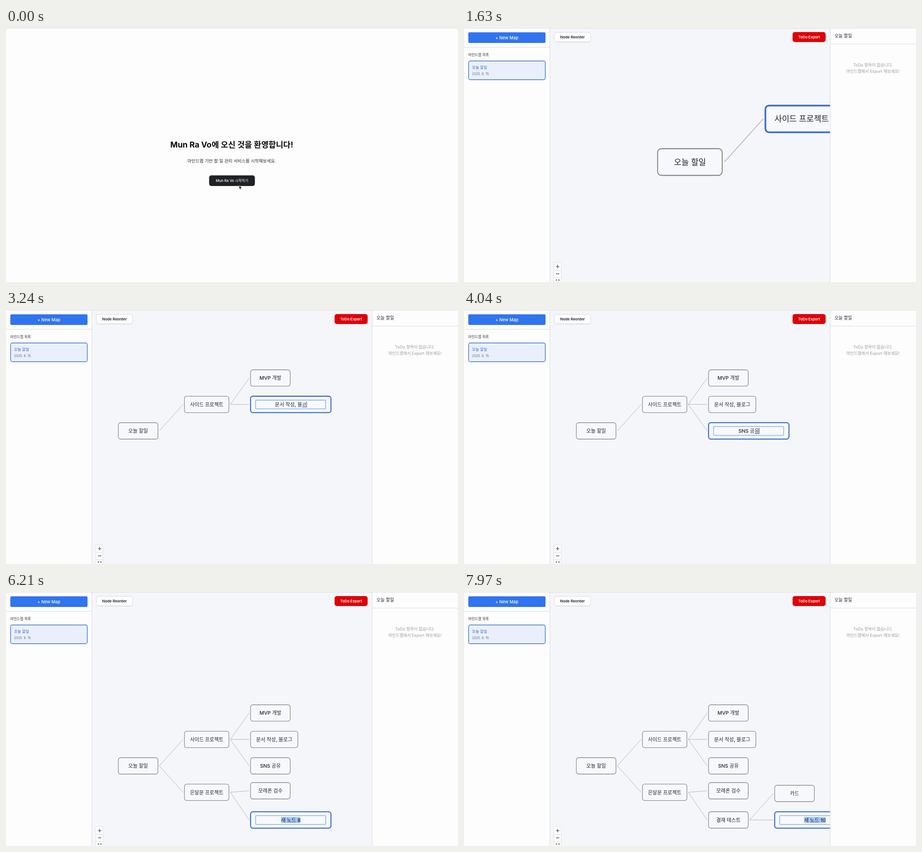
An HTML page for the animation above (8000 ms loop, 998 px wide and 561 px high).

```html
<!DOCTYPE html>
<html lang="ko">
<head>
<meta charset="utf-8">
<title>Mind map</title>
<style>
  html, body { margin: 0; width: 100%; height: 100%; overflow: hidden; background: #fdfdfd; }
  svg { display: block; width: 100%; height: 100%; }
  text { font-family: Inter, "Noto Sans CJK KR", "Noto Sans CJK", sans-serif; font-weight: 500; fill: #1f2533; white-space: pre; }
  .mid { text-anchor: middle; }
  .line { stroke: #d9dae3; }
  .icon { stroke: #333; stroke-width: 1.2; fill: none; }
  .node { font-size: 11px; }
</style>
</head>
<body>
<svg viewBox="0 0 998 561" preserveAspectRatio="none">
  <g id="app">
    <rect x="190" width="618" height="561" fill="#f5f6f9"/>
    <g id="map"></g>

    <rect x="200" y="10" width="80" height="22" rx="5" fill="#000" opacity=".07"/>
    <rect x="199.5" y="9.5" width="80" height="21" rx="5" fill="#fdfdfd" stroke="#d8d9df"/>
    <text class="mid" x="239.5" y="23" font-size="8.2" style="font-weight:600">Node Reorder</text>
    <rect x="725.5" y="9" width="73" height="22" rx="5" fill="#de0209"/>
    <text class="mid" x="762" y="23" font-size="8.1" style="font-weight:600;fill:#fff">ToDo Export</text>

    <rect x="198.500" y="518.500" width="16" height="48" fill="#fdfdfd" stroke="#e1e2e8"/>
    <path class="line" d="M199 535.500h15M199 551.500h15"/>
    <path class="icon" id="plus" d="M203 527h7.400M206.700 523.300v7.400"/>
    <path class="icon" d="M203 543h7.400"/>
    <path class="icon" d="M203.500 558.500v-2.500h2.300M207.800 556h2.300v2.500"/>

    <rect width="189.500" height="561" fill="#fdfdfd"/>
    <path class="line" d="M189.500 0v561M0 42.500h189"/>
    <rect x="9.500" y="9.500" width="170.500" height="23.500" rx="3" fill="#3074ef"/>
    <text class="mid" x="94.600" y="24.600" font-size="9.300" style="fill:#fff">+ New Map</text>
    <text x="9.500" y="62" font-size="7.800" style="fill:#333;font-weight:400">마인드맵 목록</text>
    <rect x="10.200" y="72.700" width="169.300" height="41.500" rx="4" fill="#e9f0fc" stroke="#3a72cf" stroke-width="1.400"/>
    <text id="listTitle" x="17.800" y="90.200" font-size="8.400" style="fill:#3560c6"></text>
    <text x="17.800" y="103.600" font-size="7.200" style="fill:#666b76;font-weight:400">2025. 6. 15.</text>

    <rect x="808" width="190" height="561" fill="#fdfdfd"/>
    <path class="line" d="M808.500 0v561M809 35.500h189"/>
    <text id="panelTitle" x="818" y="20.700" font-size="9.800"></text>
    <g class="mid" font-size="8.950">
      <text x="903" y="84.500" style="fill:#9a9ca3;font-weight:400">ToDo 항목이 없습니다.</text>
      <text x="903" y="98.800" style="fill:#9a9ca3;font-weight:400">마인드맵에서 Export 해보세요!</text>
    </g>
  </g>

  <g id="welcome" class="mid">
    <rect width="998" height="561" fill="#fdfdfd"/>
    <text x="498.500" y="263.700" font-size="17.600" style="fill:#0b0c0e;font-weight:700">Mun Ra Vo에 오신 것을 환영합니다!</text>
    <text x="498.500" y="297" font-size="9.600" style="fill:#2b2d31;font-weight:400">마인드맵 기반 할 일 관리 서비스를 시작해보세요.</text>
    <rect x="448.500" y="325.500" width="101" height="23.500" rx="5" fill="#1f2224"/>
    <text x="499" y="340.200" font-size="7.900" style="fill:#fff">Mun Ra Vo 시작하기</text>
  </g>
  <path d="M0 .5h998" stroke="#dedee3"/>

  <path id="arrow" transform="translate(515 347.500)" d="M0 0v8.300l1.900-1.700 1.300 2.900 1.300-.6-1.300-2.800h2.600z" fill="#111" stroke="#fff" stroke-width=".6"/>
  <path id="hand" d="M-3.300 1.200C-5-1-4.300-2.300-2.800-1.300V-3c.3-1.300 1.800-1.200 2-.2.300-1.200 1.900-1 2.100.1.400-.9 1.800-.6 1.900.4.500-.7 1.500-.3 1.500.7 0 2.600-.4 3.500-1.300 4.800v1.700h-5V3.100zM-.8-3.200v1.600M1.300-3.100v1.500M3.200-2.700v1.300" fill="#fff" stroke="#222" stroke-width=".9" stroke-linejoin="round"/>
</svg>
<script>
const LOOP = 8000, OPEN = 190, COLUMN = 146, MIN_W = 87.5, EDIT_W = 177.5;
const GREY = [112, 118, 136], BLUE = [59, 111, 205];
const $ = id => document.getElementById(id);

// born: appears, edit: input opens, type..typed: keystrokes, done: input closes
const node = (parent, col, y, start, text, born, edit, type, typed, done) =>
  ({ parent, col, y, start, text, born, edit, type, typed, done });
const nodes = [
  node(-1, 0, 0, '루트 노드', '오늘 할일', OPEN, 330, 400, 880, 945),
  node(0, 1, -58.4, '새 노드 2', '사이드 프로젝트', 1020, 1090, 1150, 1560, 1610),
  node(1, 2, -116.8, '새 노드 3', 'MVP 개발', 1840, 1910, 1970, 2340, 2390),
  node(1, 2, -58.4, '새 노드 4', '문서 작성, 블로그', 2440, 2540, 2620, 3350, 3400),
  node(1, 2, 0, '새 노드 5', 'SNS 공유', 3460, 3540, 3600, 4025, 4090),
  node(0, 1, 58.4, '새 노드 6', '은달문 프로젝트', 4200, 4280, 4340, 4780, 4830),
  node(5, 2, 55, '새 노드 7', '모래폰 검수', 5210, 5290, 5360, 5850, 5900),
  node(5, 2, 119.5, '새 노드 8', '결재 테스트', 6040, 6130, 6270, 6800, 6850),
  node(7, 3, 61, '새 노드 9', '카드', 7000, 7090, 7170, 7400, 7460),
  node(7, 3, 119.5, '새 노드 10', '', 7750, 7860, 9000, 9000, 9000)
];

const pen = document.createElement('canvas').getContext('2d');
pen.font = '500 11px Inter, "Noto Sans CJK KR", "Noto Sans CJK", sans-serif';
const measure = s => pen.measureText(s).width;
const clamp = x => Math.max(0, Math.min(1, x));
const ease = x => x * x * (3 - 2 * x);
const mix = (a, b, k) => a + (b - a) * k;

// Every intermediate state of a Hangul syllable while it is being composed.
const INITIALS = 'ㄱㄲㄴㄷㄸㄹㅁㅂㅃㅅㅆㅇㅈㅉㅊㅋㅌㅍㅎ';
function strokes(ch) {
  const code = ch.charCodeAt(0) - 0xAC00;
  if (code < 0 || code > 11171) return [ch];
  const open = String.fromCharCode(0xAC00 + code - code % 28);
  const steps = [INITIALS[Math.floor(code / 588)], open];
  return code % 28 ? [...steps, ch] : steps;
}
for (const n of nodes) {
  n.steps = [...n.text].flatMap((ch, i) => strokes(ch).map(s => n.text.slice(0, i) + s));
}

function typedText(n, t) {
  const k = Math.floor((t - n.type) / (n.typed - n.type) * n.steps.length);
  return n.steps[Math.min(k, n.steps.length - 1)];
}

const box = (x, y, w, h, rx, attrs) => `<rect x="${x}" y="${y}" width="${w}" height="${h}" rx="${rx}" ${attrs}/>`;
const label = (s, x) => `<text class="node mid" x="${x}" y="4.1">${s}</text>`;
const nodeWidth = (n, t) => Math.max(MIN_W, measure(t < n.done ? n.start : n.text) + 24.4);

function drawInput(n, t) {
  const c = EDIT_W / 2;
  const typing = t >= n.type;
  const s = typing ? typedText(n, t) : n.start;
  const w = measure(s), left = c - w / 2, right = c + w / 2;
  let out = box(11.2, -9.6, 154.6, 19.4, 1, 'fill="#f8f9fc" stroke="#78a3e6" stroke-width="1.3"');
  if (!typing) out += box(left, -6.6, w, 13.2, 0, 'fill="#a3c8f5"');
  out += label(s, c);
  if (typing) {
    const last = s.slice(-1);
    if (last > '\u3130') {
      const lw = measure(last);
      out += box(right - lw, 5, lw, 1.3, 0, 'fill="#2f74e6"');
    }
    out += box(right - .3, -6.3, .8, 12.6, 0, 'fill="#111"');
  }
  return out;
}

function drawNode(n, i, t) {
  const next = nodes[i + 1];
  const glow = next ? 1 - clamp((t - next.born) / 150) : 1;
  const color = GREY.map((g, c) => Math.round(mix(g, BLUE[c], glow)));
  const editing = t >= n.edit && t < n.done;
  const w = editing ? EDIT_W : nodeWidth(n, t);
  const frame = box(0, -18.1, w, 36.2, 5,
    `fill="#f7f8fb" stroke="rgb(${color})" stroke-width="${mix(1.1, 2.3, glow)}"`);
  const body = editing ? drawInput(n, t) : label(t < n.done ? n.start : n.text, w / 2);
  return `<g transform="translate(${n.col * COLUMN} ${n.y})">${frame}${body}</g>`;
}

function drawEdge(n, t) {
  const p = nodes[n.parent];
  if (!p) return '';
  const x = p.col * COLUMN + nodeWidth(p, t) + 3;
  return `<path d="M${x} ${p.y}L${n.col * COLUMN - 3} ${n.y}" stroke="#b1b2b8"/>`;
}

const show = (id, on) => $(id).setAttribute('visibility', on ? 'visible' : 'hidden');
let previous = '';

function render(t) {
  const zoom = ease(clamp((t - 1630) / 170));
  const pan = ease(clamp((t - 4880) / 160)) * 117;
  const x = mix(427.5, 248, zoom), y = mix(296, 267, zoom) + pan;

  const alive = nodes.filter(n => t >= n.born);
  const markup = `<g transform="translate(${x} ${y}) scale(${mix(1.63, 1, zoom)})">` +
    alive.map(n => drawEdge(n, t)).join('') +
    alive.map((n, i) => drawNode(n, i, t)).join('') + '</g>';
  if (markup !== previous) $('map').innerHTML = previous = markup;

  const root = nodes[0];
  $('listTitle').textContent = $('panelTitle').textContent = t < root.done ? root.start : root.text;
  $('plus').style.stroke = zoom > 0 ? '#333' : '#999';
  show('welcome', t < OPEN);
  show('arrow', t < root.type);
  show('hand', t >= 4860 && t < 5170);
  $('hand').setAttribute('transform', `translate(386.5 ${123.500 + pan})`);
}

const begin = performance.now();
function tick() {
  render((performance.now() - begin) % LOOP);
  requestAnimationFrame(tick);
}
tick();
</script>
</body>
</html>
```
